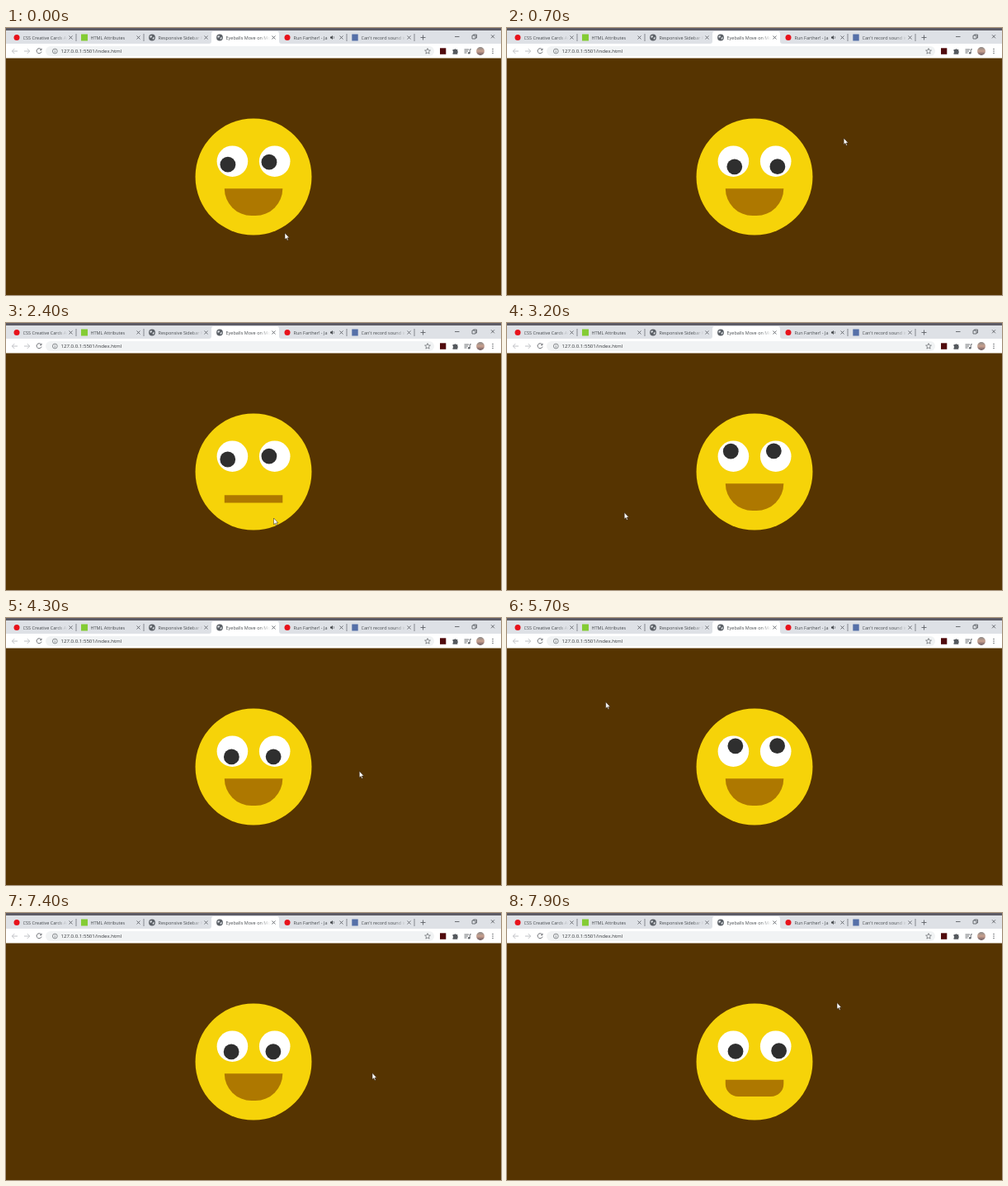
An HTML page that plays this animation: 600x323 px, repeating every 8 s.

```html
<!DOCTYPE html>
<html lang="en">
<head>
<meta charset="utf-8">
<title>Eyeballs Move on Mousemove</title>
<style>
  html, body { margin: 0; width: 100%; height: 100%; overflow: hidden; background: #563401; }
  svg { display: block; width: 600px; height: 323px; }
  text { font-family: "Open Sans", "Noto Sans", sans-serif; fill: #45494d; }
  .tab { font-size: 5.5px; }
  .url { font-size: 6.1px; fill: #33363a; }
  .line { fill: none; stroke: #5f6368; stroke-width: .9; }
  .thin { stroke-width: .7; }
  .pale { stroke: #b9bcc0; }
</style>
</head>
<body>
<svg viewBox="0 0 600 323">
  <defs>
    <linearGradient id="fade"><stop offset=".75" stop-color="#fff"/><stop offset="1"/></linearGradient>
    <linearGradient id="photo" x2="0" y2="1"><stop stop-color="#8d8a88"/><stop offset=".5" stop-color="#c9a08e"/><stop offset="1" stop-color="#6c5b62"/></linearGradient>
    <mask id="title" maskUnits="userSpaceOnUse" x="0" y="0" width="54" height="20"><rect width="54" height="20" fill="url(#fade)"/></mask>
    <circle id="red" r="3.5" fill="#e8121b"/>
    <rect id="green" x="-4" y="-4" width="8" height="8" fill="#84cc34"/>
    <rect id="blue" x="-3.7" y="-4" width="7.4" height="8" fill="#5570a8"/>
    <g id="globe"><circle r="3.9" fill="#5b6066"/><path d="M-2.6-1.6Q-.8-3 .2-1.5L-.8 0-2.4.2zM.6.4L2.7-.8Q3 1.6 1 2.6z" fill="#dfe2e6"/></g>
    <path id="close" class="line" d="M-2-2L2 2M2-2L-2 2"/>
  </defs>

  <rect width="600" height="20" fill="#dee1e6"/>
  <rect width="600" height="3" fill="#5d5b65"/>
  <rect y="19" width="600" height="18" fill="#fff"/>
  <path d="M246 19Q249 19 249 16V7Q249 4 252 4H328Q331 4 331 7V16Q331 19 334 19z" fill="#fff"/>
  <g id="tabs"></g>
  <path class="line" d="M502.5 11.500H508.500M505.500 8.500V14.500M544 10.500H549.500M565 9H569V13H565zM566.500 9V8H570.500V12H569"/>
  <use href="#close" x="590" y="10.300"/>

  <rect x="48" y="22" width="471" height="12" rx="6" fill="#f1f3f4"/>
  <path class="line pale" d="M14 28H7.500M10.300 25L7.300 28L10.300 31M22 28H28.500M25.700 25L28.700 28L25.700 31"/>
  <path class="line" d="M42.600 26A3 3 0 1 0 43 28.600M43 24.700V26.700H41"/>
  <path class="line thin" d="M56.400 28a2.900 2.900 0 1 0 5.800 0a2.900 2.900 0 1 0-5.800 0M59.300 27.500V29.700M59.300 26.200V26.800"/>
  <text class="url" x="66.500" y="30.300">127.0.0.1:5501/index.html</text>
  <path id="star" class="line thin"/>
  <rect x="526" y="24.300" width="7.300" height="7.500" fill="#500b0d"/>
  <path d="M541.500 26H543.300A1.200 1.200 0 0 1 545.600 26H547.300V28A1.200 1.200 0 0 1 547.300 30V31.700H541.500V30A1.100 1.100 0 0 0 541.500 28z" fill="#55595e"/>
  <path class="line" d="M555.500 26H561M555.500 28H560M555.500 30H558.500M562.200 30.200V25.800H564"/>
  <circle cx="561.200" cy="30.200" r="1.300" fill="#5f6368"/>
  <circle cx="575" cy="28" r="4.900" fill="url(#photo)"/>
  <path d="M590 25.600v0M590 28v0M590 30.400v0" stroke="#5f6368" stroke-width="1.500" stroke-linecap="round"/>

  <rect y="36.500" width="600" height="287" fill="#563401"/>
  <circle cx="300" cy="180" r="70.500" fill="#f6d309"/>
  <path id="mouth" fill="#ae7800"/>
  <g id="eyes"></g>
  <path id="cursor" d="M0 0V7.800L1.800 6.200L3 9L4.200 8.500L3 5.800H5.400z" fill="#fff" stroke="#2a1c0c" stroke-width=".5"/>
</svg>
<script>
const $ = id => document.getElementById(id);
const ease = u => u * u * (3 - 2 * u);

const tabs = [
  ['red', 'CSS Creative Cards An'], ['green', 'HTML Attributes'],
  ['globe', 'Responsive Sidebar Me'], ['globe', 'Eyeballs Move on Mou'],
  ['red', 'Run Farther! - Ja'], ['blue', "Can't record sound in"]
];
const active = 3, playing = 4;
const speaker = `<rect x="49" y="7" width="10" height="9" fill="#dee1e6"/>
  <path d="M52 10.500H53.300L55 9V14L53.300 12.500H52z" fill="#45494d"/>
  <path class="line thin" d="M56 10Q57.200 11.500 56 13"/>`;
$('tabs').innerHTML = tabs.map(([icon, title], i) => `
  <g transform="translate(${13 + i * 82})">
    <use href="#${icon}" y="11.500"/>
    <g transform="translate(7.500)" mask="url(#title)"><text class="tab" y="13.500">${title}</text></g>
    ${i == playing ? speaker : ''}
    <use href="#close" x="65.500" y="11.500"/>
    ${i == active || i == active - 1 ? '' : '<path class="line thin" d="M72 7V16"/>'}
  </g>`).join('');

$('star').setAttribute('d', 'M' + Array.from({ length: 10 }, (_, i) => {
  const a = i * Math.PI / 5, r = i % 2 ? 1.6 : 3.6;
  return [511 + r * Math.sin(a), 28.2 - r * Math.cos(a)];
}).join('L') + 'z');

const eyes = [274.4, 325.7], eyeY = 161.2;
$('eyes').innerHTML = eyes.map(x => `<g transform="translate(${x} ${eyeY})">
  <circle r="18.800" fill="#fff"/><circle class="pupil" r="9.400" fill="#2f2f2f"/></g>`).join('');
const pupils = document.querySelectorAll('.pupil');

// The pointer circles the face: time, x, y
const path = [
  [0, 338, 248], [500, 428, 175], [1000, 345, 80], [1400, 261, 106], [1650, 215, 155],
  [2000, 262, 222], [2400, 324.5, 236], [3100, 135, 222], [3600, 270, 270],
  [4300, 428.3, 185.3], [4800, 230, 70], [5050, 88, 130], [5400, 122, 135],
  [5700, 119.7, 101.6], [6300, 250, 316], [7400, 444, 193.5], [7550, 330, 165], [7900, 400, 108.5]
];

// Smooth curve through the path points
function pointer(t) {
  const last = path.length - 1;
  const i = Math.max(0, Math.min(last, path.findIndex(p => p[0] > t)) - 1);
  const a = path[i], b = path[i + 1], span = b[0] - a[0];
  const u = (t - a[0]) / span;
  const slope = (n, k) => {
    const p = path[Math.max(0, n - 1)], q = path[Math.min(last, n + 1)];
    return (q[k] - p[k]) / (q[0] - p[0]) * span;
  };
  return [1, 2].map(k => a[k] + (b[k] - a[k]) * ease(u)
    + slope(i, k) * u * (1 - u) ** 2 - slope(i + 1, k) * u * u * (1 - u));
}

// The mouth closes with the share of recent time spent over the face
function closing(t) {
  const samples = 45, step = 10;
  let inside = 0;
  for (let k = 1; k <= samples; k++) {
    const [x, y] = pointer(Math.max(0, t - k * step));
    inside += Math.hypot(x - 300, y - 180) < 70.5;
  }
  return inside / samples;
}

function drawMouth(p) {
  const left = 264.8, right = 335.3, top = 194.2 + 14 * p;
  const bottom = top + 32.9 - 23.5 * p, r = 32.9 * (1 - p);
  $('mouth').setAttribute('d', `M${left} ${top}H${right}V${bottom - r}A${r} ${r} 0 0 1 ${right - r} ${bottom}` +
    `H${left + r}A${r} ${r} 0 0 1 ${left} ${bottom - r}z`);
}

function frame(now) {
  const t = Math.min(7900, Math.floor(now % 8000 / 100) * 100);   // ten steps a second
  const [x, y] = t < 7900 ? pointer(t) : path[path.length - 1].slice(1);
  $('cursor').setAttribute('transform', `translate(${x} ${y})`);
  // Pupils sit a quarter turn away from the pointer
  eyes.forEach((ex, i) => {
    const angle = Math.atan2(y - eyeY, x - ex) + Math.PI / 2;
    pupils[i].setAttribute('cx', 6.8 * Math.cos(angle));
    pupils[i].setAttribute('cy', 6.8 * Math.sin(angle));
  });
  drawMouth(closing(t));
  requestAnimationFrame(frame);
}
frame(0);
</script>
</body>
</html>
```
